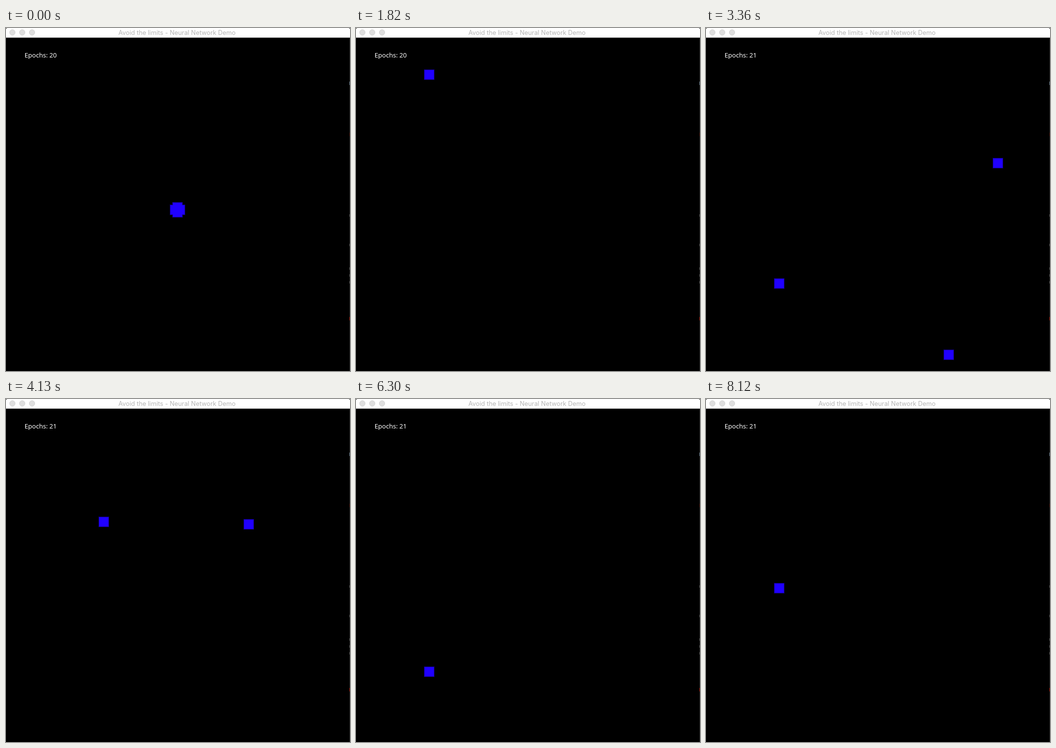
Recreate the animation shown at these times as an HTML page with a canvas. Size 700 px wide and 698 px high, loop 8190 ms.

```html
<!DOCTYPE html>
<html lang="en">
<head>
<meta charset="utf-8">
<title>Avoid the limits - Neural Network Demo</title>
<style>
  html, body { margin: 0; width: 100%; height: 100%; overflow: hidden; background: #000; }
  canvas { display: block; }
</style>
</head>
<body>
<canvas id="stage" width="700" height="698"></canvas>
<script>
const ctx = document.getElementById("stage").getContext("2d");
const TICK = 70, TICKS = 117, STEP = 5;
const START = { x: 349, y: 370 };
const DIRS = { u: [0, -1], d: [0, 1], l: [-1, 0], r: [1, 0] };

// Soft-edged square: half size and colour, from the fringe inwards.
const LAYERS = [[11, "#080040"], [10, "#1a00d0"], [9, "#2000ff"]];

// Each agent walks its legs in turn: direction, then number of steps.
const parse = text => text.split(" ").map(leg => [DIRS[leg[0]], +leg.slice(1)]);
const agents = list => list.split(",").map(parse);

const epochs = [
  {
    label: "Epochs: 20",
    clock: [[0, 1], [8, 60], [26, 193], [28, 207]],
    agents: agents(
      "u99,l99,d99,r99,u1 l99,d1 l99,l1 d99,r1 d99,d1 r99," +
      "l10 u99,u30 l99,u20 l99,l39 d99,l30 d99,r10 d99," +
      "d11 r99,u10 r99,u19 r99,u29 r99," +
      "r29 u21 d10 u50 r99,l30 u21 d49 l10 u99")
  },
  {
    label: "Epochs: 21",
    clock: [[28, 1], [36, 61], [48, 150], [70, 313], [72, 330],
            [90, 463], [96, 508], [108, 596], [116, 657]],
    agents: agents(
      "u99,l99,d99,r99,u1 r99,l1 u99,d1 l99,u20 l99,l10 u99," +
      "l40 d99,r20 d99,d21 r99,u30 r99,r40 u99," +
      "r49 d41 u200,r29 u31 d90 u90 r31 u200," +
      "l30 u33" + " d70 l10 u70 r10".repeat(4))
  }
];

// Steps taken at a given tick, linear between the clock's points.
function stepsAt(clock, tick) {
  let i = 1;
  while (i < clock.length - 1 && tick > clock[i][0]) i++;
  const [t0, s0] = clock[i - 1], [t1, s1] = clock[i];
  return Math.round(s0 + (s1 - s0) * (tick - t0) / (t1 - t0));
}

function walk(legs, steps) {
  let { x, y } = START;
  for (const [[dx, dy], count] of legs) {
    const n = Math.min(count, steps);
    x += dx * n * STEP;
    y += dy * n * STEP;
    steps -= n;
  }
  return { x, y };
}

const alive = ({ x, y }) => x >= 10 && x <= 690 && y >= 30 && y <= 710;

function rect(color, x, y, w, h) {
  ctx.fillStyle = color;
  ctx.fillRect(x, y, w, h);
}

function text(string, x, y, font, color, align) {
  ctx.font = font;
  ctx.fillStyle = color;
  ctx.textAlign = align;
  ctx.fillText(string, x, y);
}

function drawWindow() {
  ctx.fillStyle = "#fff";
  ctx.beginPath();
  ctx.roundRect(0, 0, 700, 19, [3, 3, 0, 0]);
  ctx.fill();
  rect("#a0a0a0", 0, 19, 700, 1);
  ctx.lineWidth = 1;
  ctx.strokeStyle = "#d3d3d3";
  ctx.fillStyle = "#dfdfdf";
  for (const x of [13, 33, 53]) {
    ctx.beginPath();
    ctx.arc(x, 9, 5.6, 0, 2 * Math.PI);
    ctx.fill();
    ctx.stroke();
  }
  text("Avoid the limits - Neural Network Demo", 348, 14,
       "12.8px Inter, Roboto, sans-serif", "#b5b5b5", "center");

  // Sliver of desktop along the right edge
  rect("#2b2b2b", 699, 20, 1, 678);
  for (const y of [381, 441, 489, 503, 517]) rect("#777", 699, y - 2, 1, 5);
  rect("#8fa6b8", 699, 109, 1, 7);
  rect("#5a2a20", 699, 213, 1, 7);
  rect("#c03020", 699, 588, 1, 7);
}

function draw(tick) {
  const { label, clock, agents } = epochs[tick < 28 ? 0 : 1];
  const steps = stepsAt(clock, tick);
  const spots = agents.map(legs => walk(legs, steps)).filter(alive);
  rect("#000", 0, 0, 700, 698);
  for (const [r, color] of LAYERS) {
    for (const { x, y } of spots) rect(color, x - r, y - r, 2 * r, 2 * r);
  }
  drawWindow();
  text(label, 37.8, 60, "13px 'Noto Sans', 'Open Sans', sans-serif", "#fff", "left");
}

const begin = performance.now();
function loop() {
  const time = Math.max(0, performance.now() - begin);
  draw(Math.floor(time / TICK) % TICKS);
  requestAnimationFrame(loop);
}
loop();
</script>
</body>
</html>
```
